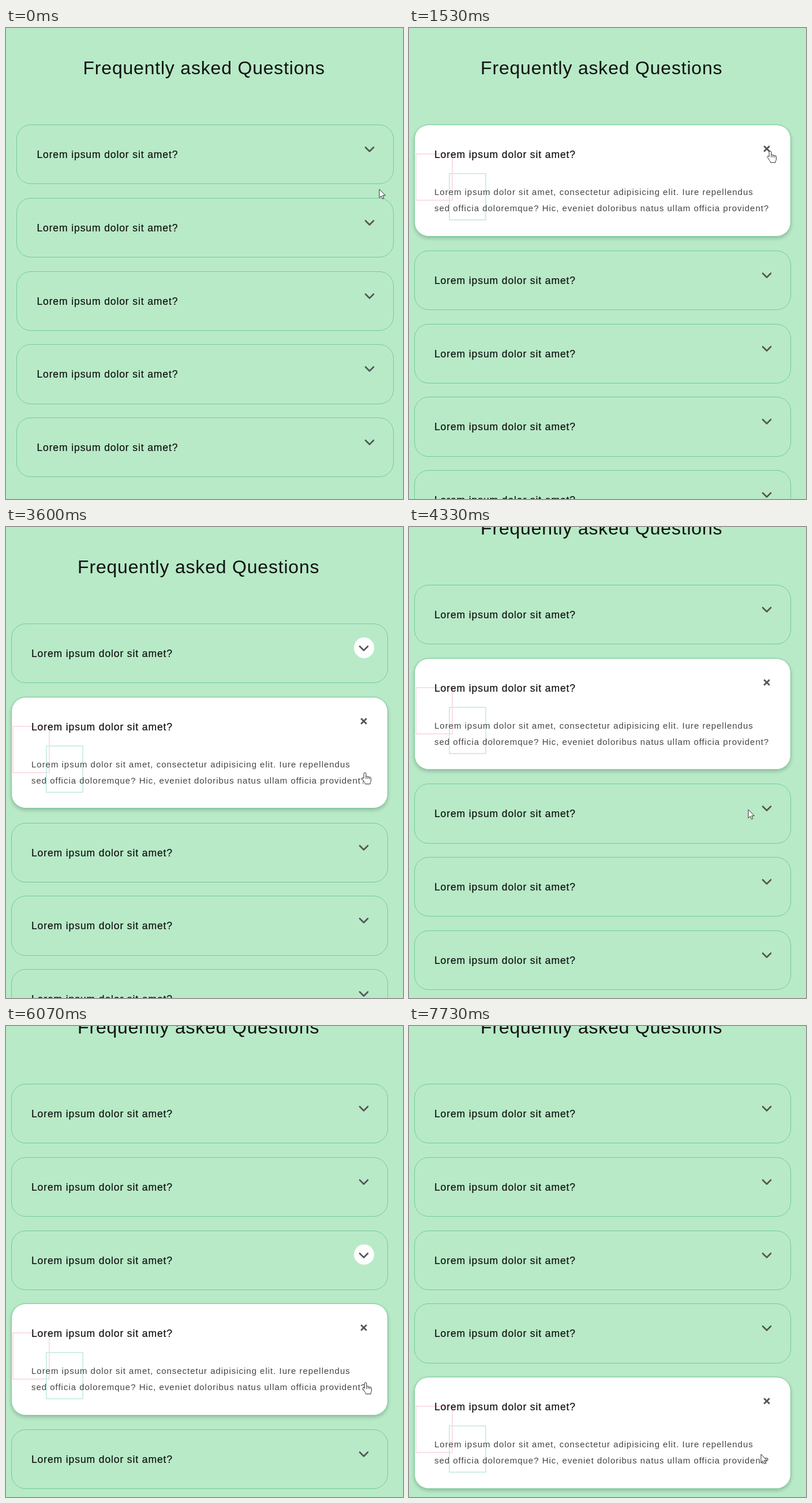
Write an HTML page that moves like this. It is 688 px wide and 815 px high and loops after 8 s.

```html
<!DOCTYPE html>
<html lang="en">
<head>
<meta charset="utf-8">
<title>Frequently asked Questions</title>
<style>
  html, body { margin: 0; width: 100%; height: 100%; overflow: hidden; background: #b8eac7; }
  body { position: relative; font-family: "Liberation Sans", Arial, sans-serif; color: #111; }
  #page, h1, .card, .card * { position: absolute; }
  #page { left: 0; top: 0; width: 654px; }
  h1, .q, .a { margin: 0; white-space: nowrap; }
  h1 { left: 115.3px; top: 49px; font: 400 32px/40px "Liberation Sans", Arial, sans-serif; letter-spacing: .8px; }
  .card { left: 0; width: 653.6px; height: 103.3px; box-sizing: border-box;
    border: 1px solid #74cb98; border-radius: 25px; }
  .card.open { height: 193.5px; background: #fff;
    box-shadow: 0 3px 6px rgba(0,0,0,.1), 0 3px 6px rgba(0,0,0,.1); }
  .q { left: 34.2px; top: 39px; font-size: 17.6px; line-height: 24px; letter-spacing: .85px;
    -webkit-text-stroke: .2px #111; }
  .a { left: 34.2px; top: 102px; font-size: 15px; line-height: 28px; letter-spacing: .98px; color: #444; }
  .box { width: 61px; height: 78px; border: 2px solid #fadfe4; left: 1px; top: 49px; }
  .box.mint { border-color: #cfeee9; left: 59px; top: 83px; }
  .a, .box, .x { display: none; }
  .open .a, .open .box, .open .x { display: block; }
  .open .v { display: none; }
  .dot { left: 592.75px; top: 23.25px; width: 35.5px; height: 35.5px; border-radius: 50%; }
  .icon { left: 592.5px; top: 23px; width: 36px; height: 36px;
    fill: none; stroke: #555; stroke-width: 2.6; stroke-linecap: round; stroke-linejoin: round; }
  .x { stroke-width: 2.8; stroke-linecap: butt; }
  #cursor { position: absolute; left: 0; top: 0; width: 24px; height: 28px; overflow: visible;
    fill: #fff; stroke: #222; stroke-width: 1; stroke-linejoin: round; }
</style>
</head>
<body>
<div id="page"><h1>Frequently asked Questions</h1></div>
<svg id="cursor">
  <path id="arrow" transform="scale(.95)" d="M0 0V15.5L3.6 12.2L6 17.5L8.4 16.4L6.1 11.3H11Z"/>
  <path id="hand" transform="scale(.95)" d="M-2 2a2 2 0 0 1 4 0v5.5a1.7 1.7 0 0 1 3.2.5a1.7 1.7 0 0 1 3 .8a1.6 1.6 0 0 1 2.8 1v5c0 2-1.5 3-1.5 6h-9c0-2-1.5-3-2.5-5l-3-4.5c-1-1.8 1-3 2.2-1.7l.8 1zM2 7.5v4M5.2 8v3.5M8.2 8.8v3"/>
</svg>
<script>
const LOOP = 8000, FADE = 460;
const TOP = 167.2, PITCH = 126.75, EXTRA = 90.9;
const SCROLL = { start: 4060, end: 4320, by: 67.2 };
// when each card opens; the one before it closes at the same moment
const opens = [1070, 3595, 4995, 6065, 7200];
// start, end, x, y, pointer on arrival
const moves = [
  [0, 0, 647, 279, 'arrow'],
  [530, 930, 625.5, 213, 'hand'],
  [1600, 2200, 622, 425, 'hand'],
  [3730, 4060, 588, 489, 'arrow'],
  [4530, 4800, 620, 475, 'hand'],
  [5270, 5930, 623, 617, 'hand'],
  [6870, 7190, 610, 741, 'arrow']
];

const $ = id => document.getElementById(id);
const page = $('page'), cursor = $('cursor');
const clamp = v => Math.min(1, Math.max(0, v));
const progress = (t, a, b) => b > a ? clamp((t - a) / (b - a)) : +(t >= a);
const smooth = p => p * p * (3 - 2 * p);
const easeOut = p => 1 - (1 - p) ** 2;

const cards = opens.map(() => {
  const card = document.createElement('div');
  card.className = 'card';
  card.innerHTML = `
    <div class="box"></div><div class="box mint"></div>
    <p class="q">Lorem ipsum dolor sit amet?</p>
    <p class="a">Lorem ipsum dolor sit amet, consectetur adipisicing elit. Iure repellendus<br>sed officia doloremque? Hic, eveniet doloribus natus ullam officia provident?</p>
    <div class="dot"></div>
    <svg class="icon v" viewBox="-18 -18 36 36"><path d="M-7-2.5L0 4.5L7-2.5"/></svg>
    <svg class="icon x" viewBox="-18 -18 36 36"><path d="M-4.8-4.8L4.8 4.8M4.8-4.8L-4.8 4.8"/></svg>`;
  page.append(card);
  return card;
});

function drawCards(t) {
  const active = opens.filter(at => t >= at).length - 1;
  cards.forEach((card, i) => {
    card.classList.toggle('open', i === active);
    card.style.top = TOP + i * PITCH + (active >= 0 && i > active ? EXTRA : 0) + 'px';
    const closed = opens[i + 1];
    const glow = t >= closed ? 1 - easeOut(clamp((t - closed) / FADE)) : 0;
    card.querySelector('.dot').style.background = `rgba(255,255,255,${glow})`;
  });
  // the open card brings in a scrollbar, which shifts the centred column
  page.style.left = (active < 0 ? 18.2 : 8.8) + 'px';
  page.style.top = -SCROLL.by * easeOut(progress(t, SCROLL.start, SCROLL.end)) + 'px';
}

function drawCursor(t) {
  let [, , x, y, kind] = moves[0];
  for (const [start, end, tx, ty, type] of moves.slice(1)) {
    if (t < start) break;
    const p = smooth(progress(t, start, end));
    x += (tx - x) * p;
    y += (ty - y) * p;
    kind = p < 1 ? 'arrow' : type;
  }
  cursor.style.transform = `translate(${Math.round(x)}px,${Math.round(y)}px)`;
  for (const name of ['arrow', 'hand']) $(name).style.display = name === kind ? '' : 'none';
}

const begin = performance.now();
function frame() {
  const t = (performance.now() - begin) % LOOP;
  drawCards(t);
  drawCursor(t);
  requestAnimationFrame(frame);
}
frame();
</script>
</body>
</html>
```
